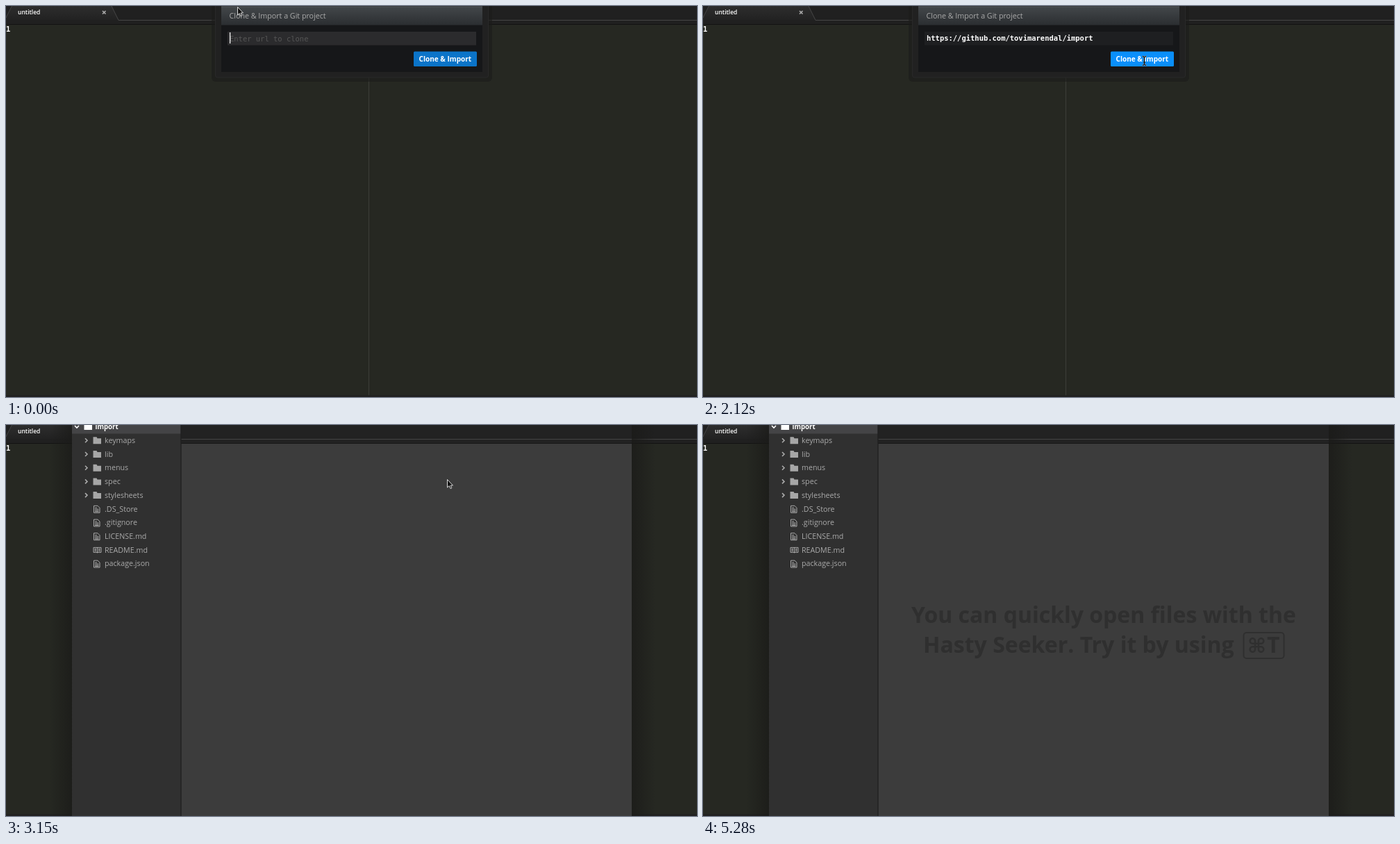
Write an HTML page that moves like this. It is 995x563 px and loops after 5.86 s.

```html
<!DOCTYPE html>
<html lang="en">
<head>
<meta charset="utf-8">
<title>Clone and import</title>
<style>
  html, body { margin: 0; width: 100%; height: 100%; overflow: hidden; background: #262822; }
  svg { display: block; width: 100vw; height: 100vh; }
  text { font: 10.7px "Open Sans", "Noto Sans", sans-serif; fill: #aaa; white-space: pre; }
  .mono { font: 10.47px "DejaVu Sans Mono", monospace; }
  .strong { font-weight: 700; fill: #fff; }
  .hint text { font-size: 32px; font-weight: 700; fill: #2f2f2f; }
  .line { fill: none; stroke: #aaa; }
</style>
</head>
<body>
<svg viewBox="0 0 995 563">
  <defs>
    <linearGradient id="header" x2="0" y2="1">
      <stop stop-color="#43474a"/><stop offset="1" stop-color="#2b2e31"/>
    </linearGradient>
    <linearGradient id="tab" x2="0" y2="1">
      <stop stop-color="#2d2d2d"/><stop offset="1" stop-color="#222"/>
    </linearGradient>
    <linearGradient id="shade">
      <stop stop-color="#1a1a18" stop-opacity="0"/><stop offset="1" stop-color="#1a1a18" stop-opacity=".75"/>
    </linearGradient>
    <path id="folder" d="M0 0H5L6 2H11.5V10H0Z"/>
    <path id="file" class="line" d="M.5 .5H6L9 3.5V10.5H.5ZM2 3.5H5M2 5.5H7.5M2 7.5H7.5M2 9H7.5"/>
    <path id="book" class="line" d="M.5 .5H11.5V7.5H.5ZM6 .5V8.5M2 2.5H4.5M2 4H4.5M2 5.5H4.5M7.5 2.5H10M7.5 4H10M7.5 5.5H10"/>
    <path id="chevron" fill="none" stroke-width="1.6" d="M0 0L3 3L0 6"/>
  </defs>

  <!-- editor -->
  <rect width="995" height="563" fill="#262822"/>
  <rect width="995" height="27" fill="#202020"/>
  <path d="M0 20L9 0H152L162 20Z" fill="url(#tab)"/>
  <path d="M0 17L8.5 0M152 0L162 20.5H995" fill="none" stroke="#454545"/>
  <path d="M0 26.5H995" stroke="#121212"/>
  <path d="M522.5 27V561" stroke="#3d3e39"/>
  <rect y="560.5" width="995" height="2.5" fill="#202020"/>
  <text class="strong" x="17" y="12" style="font-size:8.5px;font-weight:600">untitled</text>
  <path d="M139 7L143.5 11.5M143.5 7L139 11.5" stroke="#aaa" stroke-width="1.7"/>
  <text class="mono strong" x="0" y="37">1</text>

  <!-- clone dialog -->
  <g id="dialog">
    <rect x="296" y="-10" width="404" height="119" rx="6" fill="#1c1c1a" opacity=".6"/>
    <rect x="301.5" y="-10" width="393" height="113" rx="3" fill="#212121" stroke="#292929"/>
    <rect x="310" y="27" width="376" height="68" fill="#161719"/>
    <rect x="310" y="1" width="376" height="26.5" fill="url(#header)"/>
    <path d="M310 1H686" stroke="#54585b"/>
    <text x="321.5" y="18" fill="#999">Clone &amp; Import a Git project</text>
    <rect id="field" x="319" y="37" width="358" height="19.5"/>
    <text id="placeholder" class="mono" x="322" y="50.5" style="fill:#565656">Enter url to clone</text>
    <text id="url" class="mono strong" x="322" y="50">https://github.com/tovimarendal/import</text>
    <rect id="caret" y="38" width="1.2" height="16" fill="#fff"/>
    <rect id="button" x="587" y="65.5" width="91" height="21.5" rx="1.5"/>
    <text class="strong" x="594.5" y="79.5" style="font-size:10.05px">Clone &amp; Import</text>
  </g>

  <!-- project window -->
  <g id="project">
    <rect x="62" width="33" height="563" fill="url(#shade)"/>
    <rect x="-935" width="34" height="563" fill="url(#shade)" transform="scale(-1 1)"/>
    <rect x="252" width="649" height="27" fill="#222"/>
    <path d="M252 20.5H901" stroke="#454545"/>
    <path d="M252 26.5H901" stroke="#181818"/>
    <rect x="252" y="27" width="649" height="536" fill="#3c3c3c"/>
    <rect x="95" width="157" height="563" fill="#303030"/>
    <rect x="95" width="157" height="12.5" fill="#444446"/>
    <path d="M252 0V563" stroke="#202020" stroke-width="1.3"/>
    <use href="#chevron" transform="translate(105 1) rotate(90)" stroke="#fff"/>
    <use href="#folder" x="112.5" y="-3" fill="#fff"/>
    <text class="strong" x="128.5" y="6" style="font-size:9.7px">import</text>
    <g id="tree"></g>
    <g id="hint" class="hint">
      <text x="300" y="285">You can quickly open files with the</text>
      <text x="317" y="328">Hasty Seeker. Try it by using</text>
      <rect x="778.5" y="299" width="58" height="37" rx="4" fill="none" stroke="#2f2f2f" stroke-width="2"/>
      <text x="784" y="328" style="font-family:'DejaVu Sans',sans-serif;font-size:29px">⌘</text>
      <text x="812" y="328">T</text>
    </g>
  </g>

  <path id="arrow" d="M.5 .5V12L3.2 9.6L5 13.5L6.8 12.8L5.2 9H8.5Z" fill="#111" stroke="#eee" stroke-width=".9"/>
  <g id="beam" fill="none">
    <path id="beamShape" d="M-3 -6.5Q0 -6.5 0 -4Q0 -6.5 3 -6.5M0 -4V4M-3 6.5Q0 6.5 0 4Q0 6.5 3 6.5M-1.5 2H1.5" stroke="#888" stroke-opacity=".6" stroke-width="1.8"/>
    <use href="#beamShape"/>
    <path d="M-2.5 -6.5Q0 -6.5 0 -4Q0 -6.5 2.5 -6.5M0 -4V4M-2.5 6.5Q0 6.5 0 4Q0 6.5 2.5 6.5M-1.5 2H1.5" stroke="#111"/>
  </g>
</svg>
<script>
const LOOP = 5860;
const PASTE = 1070, HOVER = 1820, PRESS = 2120, CLOSE = 2260, OPEN = 3150, HINT = 4080;
const $ = id => document.getElementById(id);
const show = (id, on) => { $(id).style.display = on ? "" : "none"; };

// [start, shape, x, y]: arrows by their tip, beams by their centre
const pointer = [
  [0, "arrow", 333, 1], [320, "arrow", 347, 11], [470, "arrow", 400, 38],
  [620, "beam", 404.5, 45], [1220, "beam", 433.5, 45], [1370, "beam", 659.5, 49],
  [1520, "beam", 655.5, 57], [1670, "beam", 642, 74], [HOVER, "arrow", 635, 78],
  [PRESS, "beam", 635.5, 79], [3010, "arrow", 635, 78], [HINT, "arrow", 641, 114],
  [4230, "arrow", 827, 346], [4380, "arrow", 835, 355], [4530, "arrow", 875, 424],
  [4680, "arrow", 914, 494], [4830, "arrow", 936, 525], [4980, "arrow", 942, 553],
  [5130, "arrow", 971, 562], [5280, "none", 0, 0]
];
const caretOn = [[0, 150], [470, 920], [PASTE, 1670]];

const folders = ["keymaps", "lib", "menus", "spec", "stylesheets"];
const files = [".DS_Store", ".gitignore", "LICENSE.md", "README.md", "package.json"];
$("tree").innerHTML = [...folders, ...files].map((name, i) => {
  const y = 22.3 + 19.7 * i;
  const icon = i < folders.length
    ? `<use href="#chevron" x="114" y="${y - 3}" stroke="#aaa"/><use href="#folder" x="125.5" y="${y - 5}" fill="#a6a6a6"/>`
    : name === "README.md"
      ? `<use href="#book" x="125.5" y="${y - 4}"/>`
      : `<use href="#file" x="126" y="${y - 5}"/>`;
  return `${icon}<text x="142" y="${y + 3.7}">${name}</text>`;
}).join("");

function draw() {
  const t = performance.now() % LOOP;

  show("dialog", t < CLOSE);
  show("placeholder", t < PASTE);
  show("url", t >= PASTE);
  show("caret", caretOn.some(([from, to]) => t >= from && t < to));
  $("caret").setAttribute("x", t < PASTE ? 322 : 561.3);
  $("field").setAttribute("fill", t < PRESS ? "#2b2b2d" : "#1e1f21");
  $("button").setAttribute("fill", t < HOVER ? "#0b74c8" : t < PRESS ? "#0a80dd" : "#0a8ffa");

  show("project", t >= OPEN);
  show("hint", t >= HINT);

  const [, shape, x, y] = pointer.findLast(step => t >= step[0]);
  for (const id of ["arrow", "beam"]) {
    show(id, id === shape);
    $(id).setAttribute("transform", `translate(${x} ${y})`);
  }
  requestAnimationFrame(draw);
}
draw();
</script>
</body>
</html>
```
